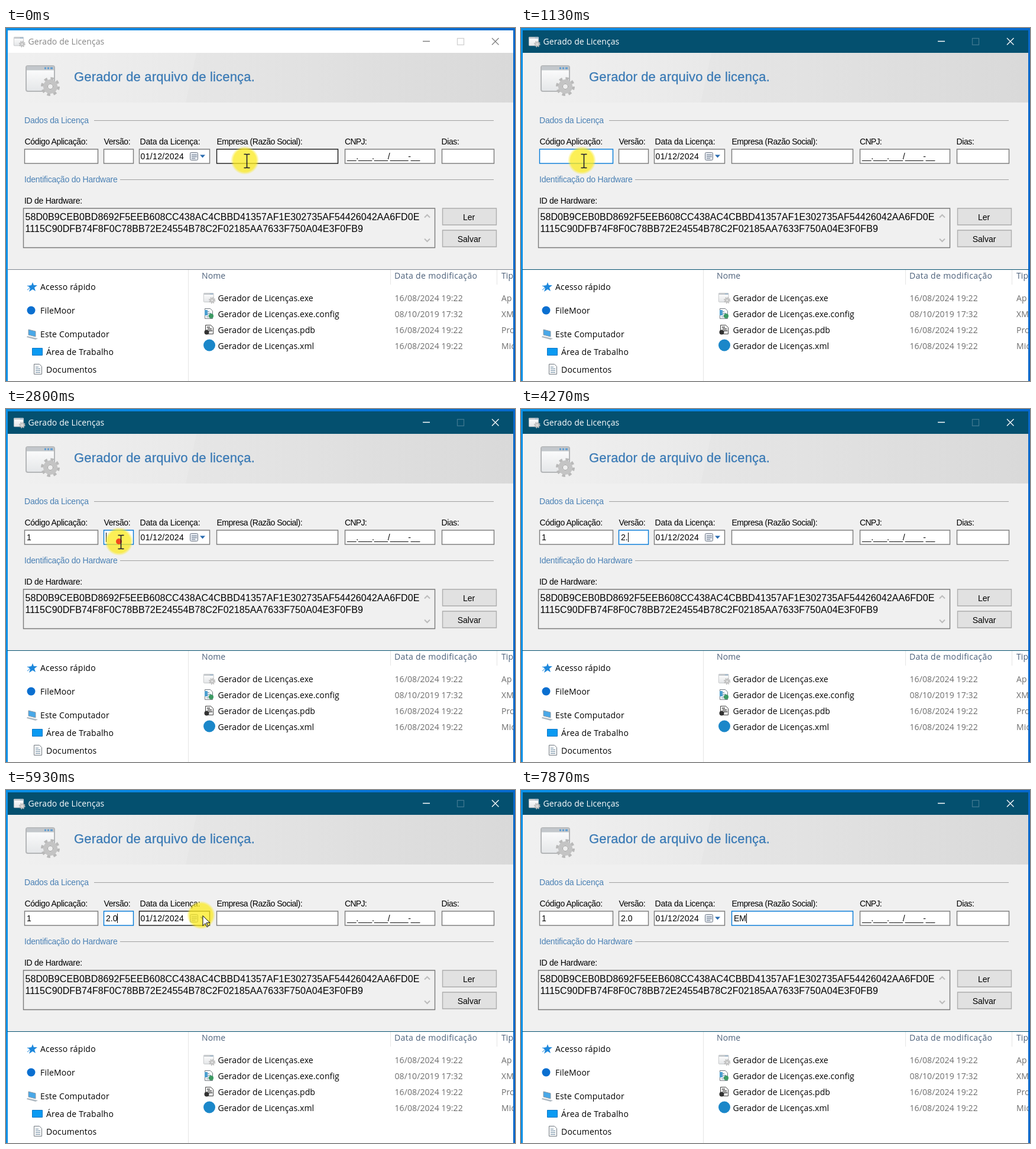
Write an HTML page that moves like this. It is 861 px wide and 597 px high and loops after 8000 ms.

```html
<!DOCTYPE html>
<html lang="pt-BR">
<head>
<meta charset="utf-8">
<title>Gerado de Licenças</title>
<style>
html, body { margin: 0; width: 100%; height: 100%; overflow: hidden; background: #0078d7; }
svg { display: block; }
.form { font: 14px "Liberation Sans", Arial, sans-serif; }
.shell { font: 14px "Open Sans", "Noto Sans", sans-serif; letter-spacing: .1px; }
.box { fill: #fff; stroke: #7a7a7a; stroke-width: 1.4; }
.box.hover { stroke: #171717; }
.box.focus { stroke: #0078d7; }
.group { fill: #4a80b4; letter-spacing: -.2px; }
.rule { stroke: #a0a0a0; }
.button { fill: #e1e1e1; stroke: #adadad; stroke-width: 1.4; }
.dim { fill: #6d6d6d; }
.head { fill: #4c607a; }
#bar { fill: #fff; }
#frame { stroke: #7d8790; }
#caption { fill: #868686; }
#controls { fill: none; stroke: #808080; stroke-width: 1.3; }
#controls rect { stroke: #d0d0d0; }
.active #bar { fill: #04506f; }
.active #frame { stroke: #04506f; }
.active #caption { fill: #fff; }
.active #controls { stroke: #fff; }
.active #controls rect { stroke: #3f7790; }
</style>
</head>
<body>
<svg id="stage" width="861" height="597" viewBox="0 0 861 597">
  <defs>
    <linearGradient id="desk">
      <stop offset="0" stop-color="#0a90e8"/><stop offset="1" stop-color="#0668cc"/>
    </linearGradient>
    <linearGradient id="banner">
      <stop offset="0" stop-color="#f0f0f0"/><stop offset=".4" stop-color="#e8e8e8"/><stop offset="1" stop-color="#dcdcdc"/>
    </linearGradient>
    <radialGradient id="glow">
      <stop offset=".8" stop-color="#fbea1e" stop-opacity=".75"/><stop offset="1" stop-color="#fbea1e" stop-opacity="0"/>
    </radialGradient>
    <linearGradient id="page" x2="0" y2="1">
      <stop offset="0" stop-color="#fff"/><stop offset="1" stop-color="#e4e6e8"/>
    </linearGradient>
    <g id="app">
      <rect x="1" y="1" width="48" height="43" rx="3" fill="url(#page)" stroke="#b4b6b8" stroke-width="2"/>
      <path d="M2 5H48" stroke="#c3c7cb" stroke-width="7"/>
      <path d="M32 5h3m2 0h3m2 0h4" stroke="#5c9bd1" stroke-width="3"/>
      <circle cx="42" cy="36" r="13" fill="none" stroke="#b9b9b9" stroke-width="6" stroke-dasharray="5 5.21"/>
      <circle cx="42" cy="36" r="8.5" fill="#f4f4f4" stroke="#c4c4c4" stroke-width="7"/>
      <circle cx="42" cy="36" r="4.5" fill="#eee" stroke="#a0a0a0"/>
    </g>
    <g id="doc">
      <path d="M.5 .5h9l4 4v13h-13z" fill="#fafafa" stroke="#737a82"/>
      <path d="M3 5.5h5M3 8.5h8M3 11.5h8M3 14.5h8" stroke="#6c8ba3"/>
    </g>
    <clipPath id="pane"><path d="M3 409H858V597H3z"/></clipPath>
  </defs>

  <path fill="url(#desk)" d="M0 0H861V597H0z"/>

  <g class="shell" clip-path="url(#pane)">
    <path fill="#fff" d="M3 409H859V597H3z"/>
    <path d="M308.5 409V597M650.5 409V434M830.5 409V434" stroke="#e5e5e5"/>
    <path d="M45 430l2 5 6 0-5 4 2 6-5-3-6 4 2-6-4-4 6-1z" fill="#1e88dc"/>
    <path d="M36 443l5-4M36 436l5 1" stroke="#1e88dc"/>
    <circle cx="42.500" cy="477.500" r="7" fill="#0a6fd0"/>
    <path d="M38 510l12 3v9l-12-3z" fill="#49a8e8" stroke="#8d9aa5"/>
    <path d="M36 521l13 3 5 1-4 2-15-4z" fill="#aeb8c0"/>
    <path d="M44.500 541.500h17v12h-17z" fill="#0a9af2" stroke="#0a74c4"/>
    <use href="#doc" x="47" y="568"/>
    <g letter-spacing=".2">
      <text x="58" y="443">Acesso rápido</text>
      <text x="58" y="483">FileMoor</text>
      <text x="58" y="523">Este Computador</text>
      <text x="68" y="553">Área de Trabalho</text>
      <text x="68" y="583">Documentos</text>
    </g>
    <g class="head">
      <text x="331" y="424">Nome</text>
      <text x="657" y="424" style="letter-spacing:.35px">Data de modificação</text>
      <text x="838" y="424">Tipo</text>
    </g>
    <use href="#app" transform="translate(334 448) scale(.35)"/>
    <use href="#doc" x="336" y="474"/>
    <circle cx="347" cy="487" r="4" fill="#3c9a62"/>
    <path d="M336 477h5v9h-5z" fill="#4d9fd0"/>
    <path d="M337.500 502.500h9l4 4v11h-13z" fill="#f4f4f4" stroke="#444"/>
    <path d="M340 506h5M341 509h7M343 512h6" stroke="#444" stroke-width="1.500"/>
    <circle cx="339.500" cy="514.500" r="4" fill="#333"/>
    <circle cx="344" cy="536.500" r="10" fill="#1b87c9"/>
    <g id="files"></g>
  </g>

  <path fill="#f0f0f0" d="M3 4H858V408H3z"/>
  <path fill="url(#banner)" d="M22 42H858V126H22z"/>
  <path fill="#000" fill-opacity=".012" d="M322 42H858V126H304zM524 42H858V126H506zM644 42H858V126H628z"/>
  <path id="bar" d="M3 4H858V42H3z"/>
  <use href="#app" transform="translate(13 15) scale(.34)"/>
  <text id="caption" class="shell" x="37.500" y="28">Gerado de Licenças</text>
  <g id="controls">
    <path d="M705 22.500H717M822 17l11.500 11.500M833.500 17l-11.500 11.500"/>
    <rect x="763.500" y="17.500" width="11" height="11"/>
  </g>
  <use href="#app" x="33" y="63"/>

  <g class="form">
    <text x="115" y="89.500" font-size="22" letter-spacing=".17" fill="#3a7ab5" stroke="#3a7ab5" stroke-width=".3">Gerador de arquivo de licença.</text>
    <text class="group" x="31" y="161">Dados da Licença</text>
    <text class="group" x="31" y="261">Identificação do Hardware</text>
    <path class="rule" d="M149 156.500H825M193 256.500H825"/>
    <text x="31.500" y="197" letter-spacing="-.34">Código Aplicação:</text>
    <text x="165.500" y="197" letter-spacing="-.4">Versão:</text>
    <text x="226.500" y="197" letter-spacing="-.2">Data da Licença:</text>
    <text x="356.500" y="197" letter-spacing="-.48">Empresa (Razão Social):</text>
    <text x="573" y="197" letter-spacing="-.7">CNPJ:</text>
    <text x="736.500" y="197" letter-spacing="-.4">Dias:</text>
    <text x="31" y="297" letter-spacing="-.27">ID de Hardware:</text>
    <g id="fields"></g>
    <text x="227.500" y="221.500" letter-spacing=".35">01/12/2024</text>
    <rect x="311.500" y="210.500" width="13" height="13" rx="2" fill="#e6eaf0" stroke="#6d7684"/>
    <path d="M314 214.500h9M314 217.500h9M314 220.500h6" stroke="#8a97a8" stroke-width="1.500"/>
    <path d="M328 214.500h9l-4.500 5z" fill="#2a6cb0"/>
    <text x="577" y="221.500" letter-spacing="-.12">__.___.___/____-__</text>

    <path d="M29.500 305H725.500V371.500H29.500z" fill="#f0f0f0" stroke="#7a7a7a" stroke-width="1.400"/>
    <g font-size="16" letter-spacing=".09">
      <text x="32.500" y="324.500">58D0B9CEB0BD8692F5EEB608CC438AC4CBBD41357AF1E302735AF54426042AA6FD0E</text>
      <text x="32.500" y="344.500">1115C90DFB74F8F0C78BB72E24554B78C2F02185AA7633F750A04E3F0FB9</text>
    </g>
    <path d="M708 320.500l4.500-4.500 4.500 4.500M708 356.500l4.500 4.500 4.500-4.500" fill="none" stroke="#bbb" stroke-width="2"/>
    <path class="button" d="M738.500 305h91v28h-91zM738.500 342h91v28h-91z"/>
    <g text-anchor="middle">
      <text x="783" y="324.500">Ler</text>
      <text x="783.500" y="361.500">Salvar</text>
    </g>
  </g>
  <path id="frame" d="M2 408.500H859"/>

  <path id="caret" d="M0 209V225" stroke="#000"/>
  <g id="pointer">
    <circle r="24" fill="url(#glow)"/>
    <g id="click">
      <circle id="ring" fill="#f9a825" fill-opacity=".22" stroke="#f5a31c" stroke-width="3"/>
      <circle id="dot" r="5" fill="#f2431c"/>
    </g>
    <path id="beam" d="M-1.500 -10.500h4l1 1 1-1h4M3.500 -10V12M-1.500 12.500h4l1-1 1 1h4" fill="none" stroke="#14142a" stroke-width="1.500"/>
    <path id="arrow" d="M3 1v17l4-4 3 6 2-1-3-6h6z" fill="#fff" stroke="#000"/>
  </g>
</svg>
<script>
const $ = id => document.getElementById(id);
const LOOP = 8000, STEP = 1000 / 15;

function add(parent, tag, attrs, text = '') {
  const el = document.createElementNS('http://www.w3.org/2000/svg', tag);
  for (const k in attrs) el.setAttribute(k, attrs[k]);
  el.textContent = text;
  return parent.appendChild(el);
}

// explorer rows
[['exe', '16/08/2024 19:22', 'Ap'], ['exe.config', '08/10/2019 17:32', 'XML'],
 ['pdb', '16/08/2024 19:22', 'Pro'], ['xml', '16/08/2024 19:22', 'Mic']].forEach(([ext, date, type], i) => {
  const y = 462 + 27 * i;
  add($('files'), 'text', { x: 358.5, y }, 'Gerador de Licenças.' + ext);
  add($('files'), 'text', { x: 657.5, y, class: 'dim' }, date);
  add($('files'), 'text', { x: 838, y, class: 'dim' }, type);
});

// the first three fields are typed into; the fourth is the date picker
const fields = [[31.5, 124], [165.5, 50], [356.5, 205], [225.5, 119], [573.5, 152], [737.5, 88]].map(([x, w]) => ({
  x, w,
  box: add($('fields'), 'rect', { x, y: 205, width: w, height: 24, class: 'box' }),
  label: add($('fields'), 'text', { x: x + 3.5, y: 221.5 })
}));

// time, focused field, its text, caret shown
const edits = [
  [600, 0, '', 1], [1130, 0, '', 0], [1670, 0, '', 1], [2000, 0, '1', 1], [2200, 0, '1', 0],
  [2800, 1, '', 1], [3270, 1, '', 0], [3930, 1, '2', 1], [4270, 1, '2.', 1], [4600, 1, '2.0', 1],
  [5130, 1, '2.0', 0], [5660, 1, '2.0', 1], [6130, 1, '2.0', 0],
  [6270, 2, '', 1], [6800, 2, '', 0], [7330, 2, '', 1], [7670, 2, 'E', 1], [7870, 2, 'EM', 1]
];
const path = [
  [0, 404, 224], [67, 380, 226], [133, 310, 228], [200, 220, 228], [267, 140, 226], [333, 103, 224],
  [2000, 103, 224], [2133, 145, 225], [2267, 191, 224],
  [5333, 191, 224], [5467, 163, 228], [5600, 204, 218], [5867, 310, 212], [6133, 390, 210.5]
];
const clicks = [600, 2800, 6270];
const hidden = [[2000, 2060], [3870, 5400], [7600, LOOP]];

function pointerAt(t) {
  const i = path.findIndex(p => p[0] > t);
  if (i < 0) return path[path.length - 1].slice(1);
  const [t0, x0, y0] = path[i - 1], [t1, x1, y1] = path[i];
  const k = (t - t0) / (t1 - t0);
  return [x0 + (x1 - x0) * k, y0 + (y1 - y0) * k];
}

function draw(now) {
  const start = Math.floor((now % LOOP) / STEP + .1) % 120 * STEP;
  const t = start + 5;

  let focus = -1, caret = 0;
  const texts = ['', '', ''];
  for (const [at, field, text, on] of edits) {
    if (at > t) break;
    focus = field;
    caret = on;
    texts[field] = text;
  }

  const [x, y] = pointerAt(start);
  const shown = !hidden.some(([a, b]) => t >= a && t < b);
  const over = fields.findIndex(f => x + 3 >= f.x && x + 3 <= f.x + f.w);
  fields.forEach((f, i) => {
    f.box.setAttribute('class', 'box' + (i === focus ? ' focus' : i === over && shown ? ' hover' : ''));
    if (i < 3) f.label.textContent = texts[i];
  });
  $('stage').setAttribute('class', focus < 0 ? '' : 'active');

  $('caret').style.display = caret ? '' : 'none';
  if (caret) {
    const f = fields[focus];
    const w = texts[focus] ? f.label.getComputedTextLength() : 0;
    $('caret').setAttribute('transform', `translate(${Math.floor(f.x + 4 + w) + .5})`);
  }

  $('pointer').style.display = shown ? '' : 'none';
  $('pointer').setAttribute('transform', `translate(${x} ${y})`);
  const arrow = over < 0 || over === 3;
  $('arrow').style.display = arrow ? '' : 'none';
  $('beam').style.display = arrow ? 'none' : '';

  const age = t - Math.max(-LOOP, ...clicks.filter(c => c <= t));
  $('click').style.display = age < 470 ? '' : 'none';
  if (age < 470) {
    $('ring').setAttribute('r', 3 + .064 * age);
    $('ring').setAttribute('opacity', Math.min(1, age / 60, (470 - age) / 210));
    $('dot').setAttribute('opacity', Math.max(0, 1 - age / 150));
  }
}

const begin = performance.now();
(function tick() {
  draw(performance.now() - begin);
  requestAnimationFrame(tick);
})();
</script>
</body>
</html>
```
